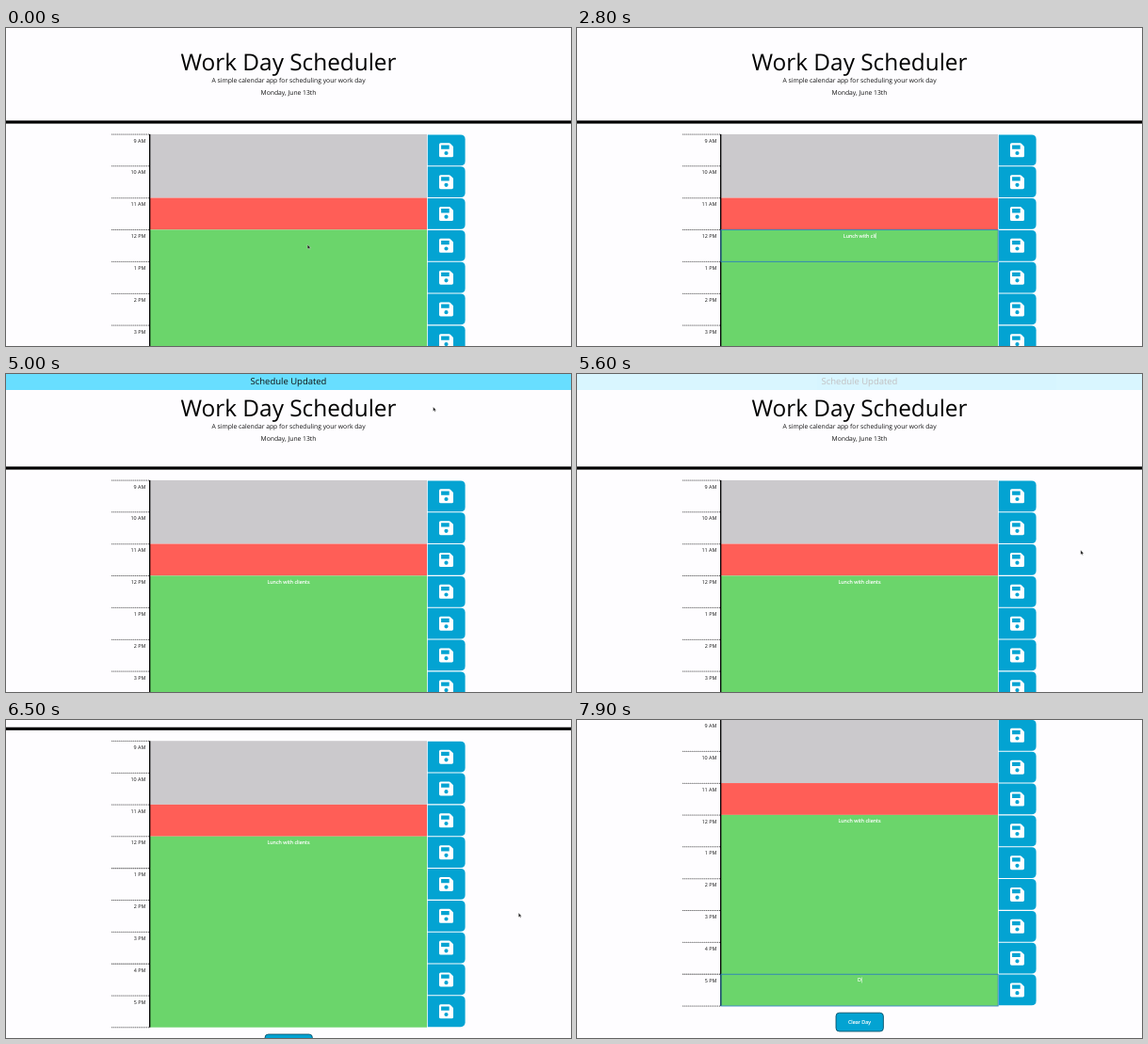
Animation of 600 by 338 pixels, one loop 8000 ms. Source, as an HTML page:

```html
<!DOCTYPE html>
<html lang="en">
<head>
<meta charset="utf-8">
<title>Work Day Scheduler</title>
<style>
  html, body { margin: 0; width: 100%; height: 100%; overflow: hidden; background: #fefdff; }
  svg { display: block; width: 100vw; height: 100vh; }
  text {
    font-family: "Open Sans", sans-serif; font-size: 5.42px; fill: #111;
    text-anchor: middle; white-space: pre; text-rendering: geometricPrecision;
  }
  .title { font-size: 24.36px; fill: #000; }
  .lead { font-size: 6.77px; }
  .notice { font-size: 9.47px; }
  .hour { text-anchor: end; }
  .light { fill: #fff; stroke: #fff; stroke-width: 0.15px; }
</style>
</head>
<body>
<svg id="stage" viewBox="0 0 600 338"></svg>
<script>
const LOOP = 8000, STEP = 100;
const TOP = 112.9, PITCH = 33.83, ROWS = 9, NOON = 3, EVENING = 8;
const BLUE = '#03a3d2', HOVER = '#68deff';
const LUNCH = 'Lunch with clients';
const FLOPPY = 'M-5.9-7.5H3.1Q3.8-7.5 4.3-7L7-4.3Q7.5-3.8 7.5-3.1V5.9Q7.5 7.5 5.9 7.5H-5.9Q-7.5 7.5-7.5 5.9V-5.9Q-7.5-7.5-5.9-7.5Z' +
  'M-5.4-5.4H3.2V-1.1H-5.4ZM-2.1 3.2A2.1 2.1 0 0 0 2.1 3.2A2.1 2.1 0 0 0-2.1 3.2Z';

const stage = document.getElementById('stage');

function set(node, attrs) {
  for (const key in attrs) node.setAttribute(key, attrs[key]);
}
function add(parent, tag, attrs, text = '') {
  const node = document.createElementNS('http://www.w3.org/2000/svg', tag);
  set(node, attrs);
  node.textContent = text;
  parent.append(node);
  return node;
}
const label = (parent, x, y, cls, text) => add(parent, 'text', { x, y, class: cls }, text);
const rowTop = row => TOP + row * PITCH;

const during = (t, from, to) => t >= from && t < to;
const ramp = (t, from, to) => Math.min(1, Math.max(0, (t - from) / (to - from)));
const smooth = u => u * u * (3 - 2 * u);

const scrollAt = t => 113.5 * (1 - (1 - ramp(t, 5950, 6800)) ** 1.54);
const noticeAt = t => ramp(t, 4100, 4500) - ramp(t, 5300, 5700);

// The first keys come slowly, the rest at a steady pace.
function typedAt(t) {
  const slow = Math.floor((t - 700) / 300);
  const steady = 3 + Math.floor((t - 1466) / 113);
  return LUNCH.slice(0, Math.max(0, slow, steady));
}

function pointerAt(t) {
  let x = 320.2, y = 230.3;
  const moveTo = (toX, toY, from, to) => {
    const u = smooth(ramp(t, from, to));
    x += (toX - x) * u;
    y += (toY - y) * u;
  };
  moveTo(467.8, 232.6, 3400, 3800);
  moveTo(453.6, 35, 4500, 5000);
  moveTo(544.3, 205, 5200, 5700);
  moveTo(312, 286, 6600, 7300);
  return { x, y };
}

const page = add(stage, 'g', {});
label(page, 300, 44.5, 'title', 'Work Day Scheduler');
label(page, 300, 58.4, 'lead', 'A simple calendar app for scheduling your work day');
label(page, 300, 70.7, 'lead', 'Monday, June 13th');
add(page, 'rect', { y: 98.4, width: 600, height: 3.2 });

function block(from, to, fill) {
  add(page, 'rect', { x: 153, y: rowTop(from), width: 294, height: (to - from) * PITCH, fill });
}
block(0, 2, '#cbc9cc');
block(2, NOON, '#ff5e57');
block(NOON, ROWS, '#6bd56b');
add(page, 'rect', { x: 152, y: TOP, width: 1.3, height: ROWS * PITCH });

for (let row = 0; row <= ROWS; row++) {
  add(page, 'path', { d: `M112.8 ${rowTop(row) + 0.1}H151.6`, stroke: '#000', 'stroke-width': 1.05,
    'stroke-dasharray': '0 2.03', 'stroke-linecap': 'round' });
}
const buttons = Array.from({ length: ROWS }, (_, row) => {
  const y = rowTop(row), hour = 9 + row;
  label(page, 148.4, y + 8.7, 'hour', `${(hour - 1) % 12 + 1} ${hour < 12 ? 'AM' : 'PM'}`);
  const shape = add(page, 'path', { d: `M447.8 ${y + 0.5}h35q4.8 0 4.8 4.8v23.2q0 4.8-4.8 4.8h-35z` });
  const icon = add(page, 'path', { d: FLOPPY, fill: '#fff', 'fill-rule': 'evenodd' });
  return { shape, icon, middle: y + PITCH / 2 };
});

add(page, 'rect', { x: 275, y: 424.7, width: 50.4, height: 19.8, rx: 3.6, fill: BLUE,
  stroke: '#05465c', 'stroke-width': 0.8 });
label(page, 300, 436.8, 'light', 'Clear Day');

const ring = add(page, 'rect', { x: 152.9, width: 294.3, height: PITCH - 0.1, fill: 'none',
  stroke: '#2c80bd', 'stroke-width': 0.9 });
const lunch = label(page, 300, rowTop(NOON) + 8.4, 'light');
const evening = label(page, 300, rowTop(EVENING) + 8.4, 'light');
const caret = add(page, 'rect', { width: 0.5, height: 6, fill: '#fff' });

const notice = add(stage, 'g', {});
add(notice, 'rect', { width: 600, height: 17, fill: HOVER });
label(notice, 300, 11.4, 'notice', 'Schedule Updated');

const pointer = add(stage, 'path', { d: 'M0 0V4.6L1.1 3.7 1.9 5.3 2.6 5 1.9 3.4H3.3Z', fill: '#111',
  stroke: '#fff', 'stroke-width': 0.35 });

function draw(t) {
  const scroll = scrollAt(t), { x, y } = pointerAt(t);
  const visible = !during(t, 700, 3500) && t < 7800;
  set(page, { transform: `translate(0 ${-scroll})` });
  set(pointer, { transform: `translate(${x} ${y})`, opacity: +visible });
  set(notice, { opacity: noticeAt(t) });

  const hovered = visible && during(x, 447, 488) ? Math.floor((y + scroll - TOP) / PITCH) : -1;
  buttons.forEach(({ shape, icon, middle }, row) => {
    const over = row === hovered;
    set(shape, { fill: over ? HOVER : BLUE });
    set(icon, { transform: `translate(467.5 ${middle}) scale(${over ? 1.2 : 1})` });
  });

  lunch.textContent = typedAt(t);
  evening.textContent = t >= 7900 ? 'D' : '';

  const atEnd = t >= 7400;
  const row = atEnd ? EVENING : NOON, field = atEnd ? evening : lunch;
  set(ring, { y: rowTop(row) + 0.2, opacity: +(atEnd || during(t, 200, 4100)) });
  set(caret, { x: 300.1 + field.getComputedTextLength() / 2, y: rowTop(row) + 3.4,
    opacity: +(atEnd || during(t, 700, 3300)) });
}

function frame(now) {
  draw(Math.floor(now % LOOP / STEP) * STEP);
  requestAnimationFrame(frame);
}
draw(0);
requestAnimationFrame(frame);
</script>
</body>
</html>
```
